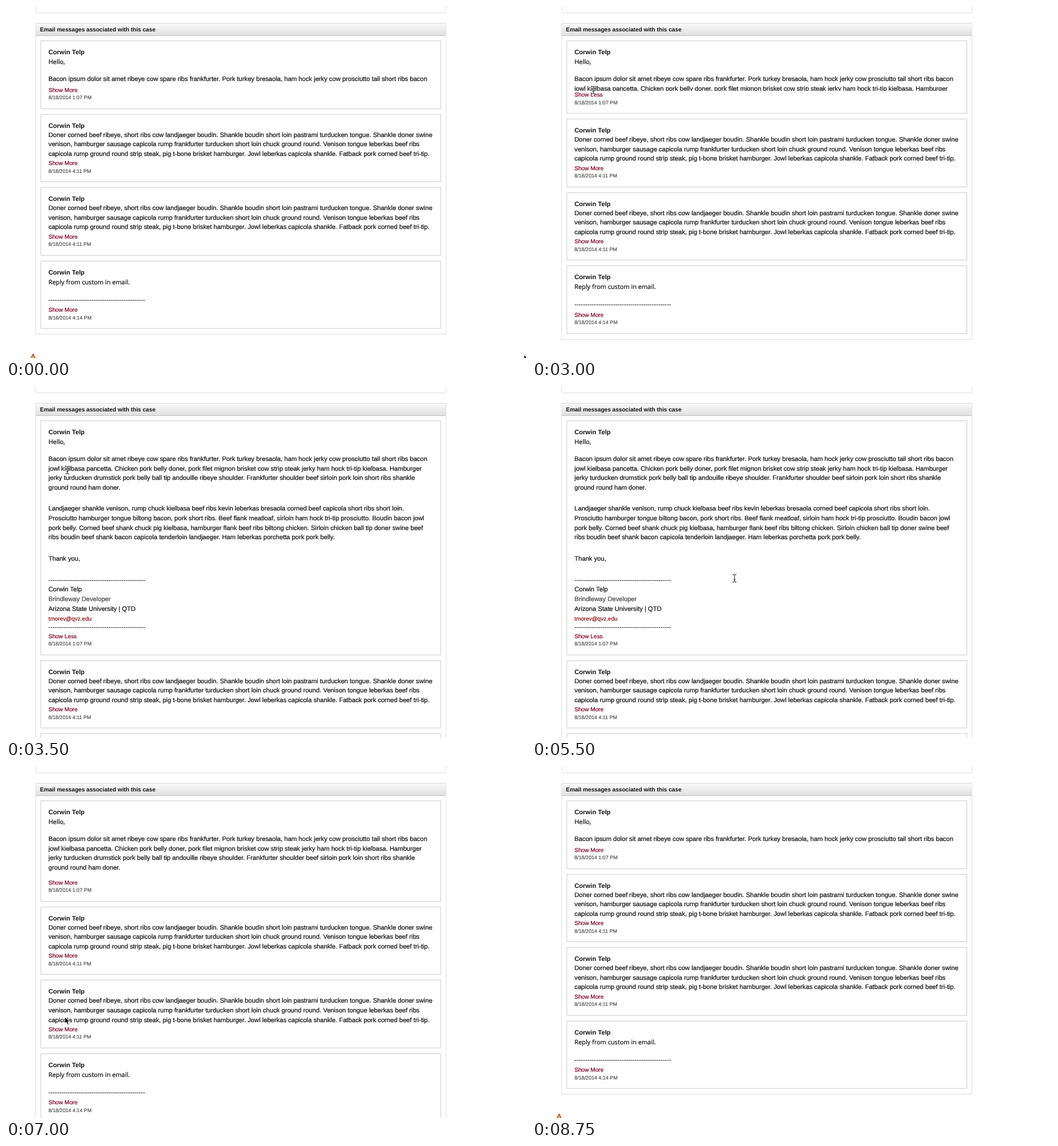
Write an HTML page that moves like this. It is 796x540 px and loops after 9000 ms.

```html
<!DOCTYPE html>
<html lang="en">
<head>
<meta charset="utf-8">
<title>Email messages</title>
<style>
  html, body { margin: 0; width: 100%; height: 100%; overflow: hidden; background: #fff; }
  #stage {
    position: relative; width: 796px; height: 540px; overflow: hidden;
    font: 9.81px/14px "Liberation Sans", Arial, sans-serif; color: #111;
    -webkit-text-stroke: .2px; text-rendering: geometricPrecision;
  }
  .above, .panel { position: absolute; left: 45px; width: 627px; border: 1px solid #e4e4e4; }
  .above { top: -20px; height: 29px; }
  .panel { top: 26px; box-sizing: border-box; width: 629px; border-top: 0; }
  .head {
    box-sizing: border-box; height: 20px; margin-bottom: 7px; padding-left: 6px;
    border-top: 1px solid #ddd; border-bottom: 1px solid #c6c6c6;
    background: linear-gradient(#fafafa, #dfdfdf);
    font-weight: bold; font-size: 8.82px; line-height: 19px; -webkit-text-stroke: 0;
  }
  .card {
    position: relative; box-sizing: border-box; width: 613px; margin: 0 0 8px 7px;
    border: 1px solid #d9d9d9; box-shadow: 0 0 2px #e6e6e6; background: #fff;
  }
  .card p, .card div { position: absolute; left: 11px; margin: 0; white-space: pre; }
  .card .body { top: 23px; width: 600px; overflow: hidden; }
  .body p { left: 0; }
  .name { top: 11px; font-weight: bold; -webkit-text-stroke: 0; }
  .card .link { bottom: 21px; height: 14px; font-size: 8.85px; color: #7d0022; }
  .card .date { bottom: 8.5px; height: 14px; font-size: 7.8px; color: #555; }
  .soft { font-family: "Open Sans", "Noto Sans", sans-serif; font-size: 9.6px; }
  .role { color: #444; }
  .mail { font-size: 8.7px; color: #8b1212; }
  .rule { font-size: 9.9px; }
  svg { position: absolute; left: 0; top: 0; overflow: visible; }
</style>
</head>
<body>
<div id="stage">
  <div class="above"></div>
  <div class="panel" id="panel"><div class="head">Email messages associated with this case</div></div>
  <svg width="796" height="540">
    <g id="warn">
      <path d="M41.5 533.5L47 545H36z" fill="#e8923a" stroke="#8c3418"/>
      <path d="M41.5 536.5L43.5 541H39.5z" fill="#f0b458"/>
    </g>
    <path id="arrow" d="M0 0V10.2L2.4 8L4.3 12.2L6.2 11.4L4.4 7.3H7.6z" fill="#000" stroke="#fff" stroke-width=".9"/>
    <g id="beam" fill="none">
      <path id="beamLine" d="M-3 -6Q0 -6 0 -4.5Q0 -6 3 -6M0 -4.5V4.5M-3 6Q0 6 0 4.5Q0 6 3 6M-1.5 2H1.5" stroke="#222"/>
    </g>
  </svg>
</div>
<script>
const LOOP = 9000, STEP = 250, GROW = 255, SLIDE = 400;
const OPEN_AT = 2956, CLOSE_AT = 6717;
const $ = id => document.getElementById(id);
const panel = $("panel");
const SENDER = "Corwin Telp";
const RULE = "-".repeat(45);

// Each line: centre within the body, text, optional class
const longMail = [
  [8, "Hello,", "soft"],
  [35, "Bacon ipsum dolor sit amet ribeye cow spare ribs frankfurter. Pork turkey bresaola, ham hock jerky cow prosciutto tail short ribs bacon"],
  [49.7, "jowl kielbasa pancetta. Chicken pork belly doner, pork filet mignon brisket cow strip steak jerky ham hock tri-tip kielbasa. Hamburger"],
  [64.3, "jerky turducken drumstick pork belly ball tip andouille ribeye shoulder. Frankfurter shoulder beef sirloin pork loin short ribs shankle"],
  [79, "ground round ham doner."],
  [111.2, "Landjaeger shankle venison, rump chuck kielbasa beef ribs kevin leberkas bresaola corned beef capicola short ribs short loin."],
  [125.9, "Prosciutto hamburger tongue biltong bacon, pork short ribs. Beef flank meatloaf, sirloin ham hock tri-tip prosciutto. Boudin bacon jowl"],
  [140.5, "pork belly. Corned beef shank chuck pig kielbasa, hamburger flank beef ribs biltong chicken. Sirloin chicken ball tip doner swine beef"],
  [155.2, "ribs boudin beef shank bacon capicola tenderloin landjaeger. Ham leberkas porchetta pork pork belly."],
  [187.7, "Thank you,"],
  [221, RULE, "rule"],
  [235.2, SENDER],
  [250, "Brindleway Developer", "role"],
  [264.6, "Arizona State University | QTD"],
  [279, "tmorev@qvz.edu", "mail"],
  [293, RULE, "rule"]
];
const shortMail = [
  [8, "Doner corned beef ribeye, short ribs cow landjaeger boudin. Shankle boudin short loin pastrami turducken tongue. Shankle doner swine"],
  [22.7, "venison, hamburger sausage capicola rump frankfurter turducken short loin chuck ground round. Venison tongue leberkas beef ribs"],
  [37.4, "capicola rump ground round strip steak, pig t-bone brisket hamburger. Jowl leberkas capicola shankle. Fatback pork corned beef tri-tip."]
];
const reply = [[8, "Reply from custom in email.", "soft"], [36, RULE, "rule"]];

function add(parent, tag, cls, text = "") {
  const el = document.createElement(tag);
  el.className = cls;
  el.textContent = text;
  return parent.appendChild(el);
}

function addCard(lines, time) {
  const card = add(panel, "div", "card");
  add(card, "p", "name", SENDER);
  const body = add(card, "div", "body");
  for (const [y, text, cls = ""] of lines) add(body, "p", cls, text).style.top = y - 6 + "px";
  const link = add(card, "p", "link", "Show More");
  add(card, "p", "date", "8/18/2014 " + time + " PM");
  const resize = extra => {
    card.style.height = 104.5 + extra + "px";
    body.style.height = 45 + extra + "px";
  };
  resize(0);
  return { link, resize };
}

const first = addCard(longMail, "1:07");
addCard(shortMail, "4:11");
addCard(shortMail, "4:11");
addCard(reply, "4:14");

// White halo beneath the text cursor
const halo = $("beamLine").cloneNode();
halo.removeAttribute("id");
halo.setAttribute("stroke", "#fff");
halo.setAttribute("stroke-width", "2");
$("beam").prepend(halo);

// Pointer path: time, x, y
const path = [
  [0, 793, 535], [250, 780, 500], [750, 690, 380], [1250, 597, 250], [1750, 330, 165],
  [2250, 89, 141], [2500, 92, 133], [2750, 94, 129], [3750, 94, 129], [4250, 150, 160],
  [5000, 430, 210], [5500, 310, 295], [6000, 110, 378], [6250, 90, 385], [7250, 90, 385],
  [7500, 170, 375], [7750, 303, 326], [8000, 370, 210], [8250, 425, 70], [8500, 440, -30], [9000, 440, -30]
];

function pointer(t) {
  const i = path.findIndex(p => p[0] > t);
  const [t0, x0, y0] = path[i - 1], [t1, x1, y1] = path[i];
  const k = (t - t0) / (t1 - t0);
  return [x0 + (x1 - x0) * k, y0 + (y1 - y0) * k];
}

const swing = p => 0.5 - Math.cos(Math.PI * Math.min(1, Math.max(0, p))) / 2;

function draw() {
  const t = Math.floor(performance.now() % LOOP / STEP) * STEP;
  const extra = GROW * (swing((t - OPEN_AT) / SLIDE) - swing((t - CLOSE_AT) / SLIDE));
  first.resize(extra);
  first.link.textContent = t > OPEN_AT && t < CLOSE_AT ? "Show Less" : "Show More";
  $("warn").setAttribute("transform", `translate(0 ${extra})`);

  const overText = t >= 2000 && t < 5750;
  const place = `translate(${pointer(t).join(" ")})`;
  for (const [id, on] of [["beam", overText], ["arrow", !overText]]) {
    $(id).setAttribute("transform", place);
    $(id).style.display = on ? "" : "none";
  }
  requestAnimationFrame(draw);
}
draw();
</script>
</body>
</html>
```
